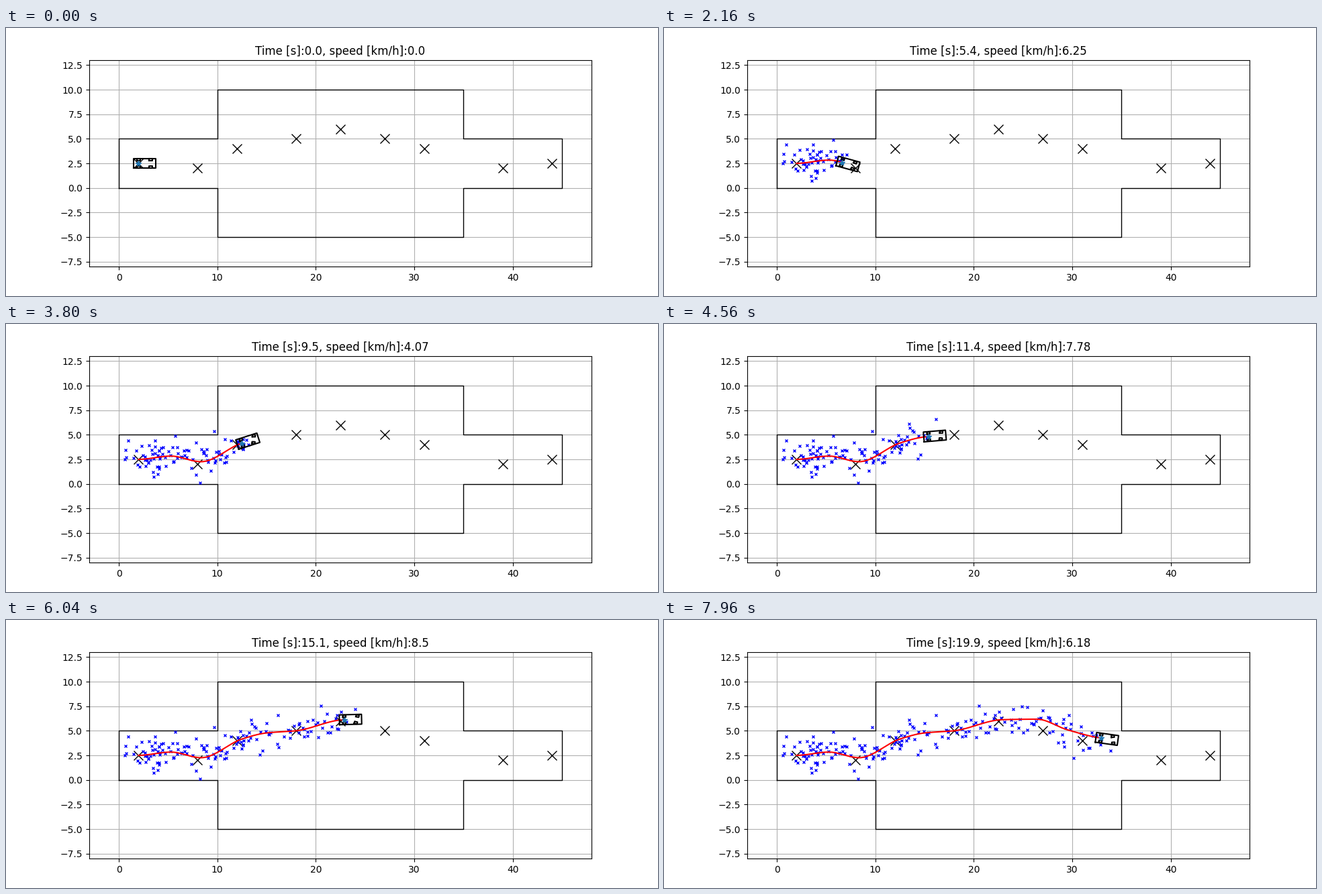
A matplotlib script that plays this animation: 971 px wide and 400 px high, repeating every 8 s.

```python
import numpy as np
import matplotlib.pyplot as plt
from matplotlib.animation import FuncAnimation

FRAMES, STEP_MS = 200, 40
WHEEL_BASE = 1.25

WALL = np.array([(0, 0), (10, 0), (10, -5), (35, -5), (35, 0), (45, 0), (45, 5),
                 (35, 5), (35, 10), (10, 10), (10, 5), (0, 5), (0, 0)])
GOALS = np.array([(2, 2.5), (8, 2), (12, 4), (18, 5), (22.5, 6), (27, 5),
                  (31, 4), (39, 2), (44, 2.5)])

# key points of the driven line: x, y
PATH = np.array([(2, 2.5), (5.3, 2.83), (8.35, 2.26), (12.5, 4.16), (15, 4.78), (18, 5),
                 (22.9, 6.13), (26.4, 6.18), (29.5, 5.1), (32.9, 4.26), (35, 4.05)])

# time [s], x [m], speed [km/h]
DRIVE = np.array([(0, 2, 0), (2.7, 4.1, 2.68), (5.4, 6.62, 6.25),
                  (9.5, 12.5, 4.07), (11.4, 15.42, 7.78), (15.1, 22.9, 8.5),
                  (19.9, 32.9, 6.18)])


def hermite(t, knots, vals, slopes):
    """Value and derivative of a cubic Hermite curve."""
    k = np.clip(np.searchsorted(knots, t, side="right") - 1, 0, len(knots) - 2)
    h = knots[k + 1] - knots[k]
    u = (t - knots[k]) / h
    p, q, a, b = vals[k], vals[k + 1], slopes[k] * h, slopes[k + 1] * h
    c2 = 3 * (q - p) - 2 * a - b
    c3 = 2 * (p - q) + a + b
    return p + u * (a + u * (c2 + u * c3)), (a + u * (2 * c2 + 3 * u * c3)) / h


def smooth_slopes(x, y):
    """Harmonic mean of neighbouring slopes, flat at every turning point."""
    d = np.diff(y) / np.diff(x)
    a, b = d[:-1], d[1:]
    inner = [2 * p * q / (p + q) if p * q > 0 else 0 for p, q in zip(a, b)]
    return np.array([0, *inner, d[-1]])


def rotate(pts, angle):
    c, s = np.cos(angle), np.sin(angle)
    return pts @ np.array([[c, s], [-s, c]])


def box(x0, x1, y0, y1):
    return np.array([(x0, y0), (x1, y0), (x1, y1), (x0, y1), (x0, y0)])


# road geometry on a dense grid
grid_x = np.arange(2, 35, 0.05)
grid_y, grid_slope = hermite(grid_x, *PATH.T, smooth_slopes(*PATH.T))
grid_yaw = np.arctan(grid_slope)
arc = np.r_[0, np.cumsum(np.hypot(np.diff(grid_x), np.diff(grid_y)))]
curve = np.convolve(np.gradient(grid_yaw, arc), np.ones(17) / 17, "same")

# pose for every step
times = np.arange(FRAMES) / 10
dist, speed = hermite(times, DRIVE[:, 0], np.interp(DRIVE[:, 1], grid_x, arc),
                      DRIVE[:, 2] / 3.6)
xs, ys, yaws, bend = (np.interp(dist, arc, g) for g in (grid_x, grid_y, grid_yaw, curve))
steers = np.clip(np.arctan(2.2 * WHEEL_BASE * bend), -0.38, 0.38)
steers *= np.minimum(times, 1)  # wheels start straight

# one noisy position fix per step
rng = np.random.default_rng(4)
fixes = np.c_[xs, ys] + rng.normal(0, 0.85, (FRAMES, 2))

BODY = box(-0.5, 1.75, -0.5, 0.5)
WHEELS = [box(-0.15, 0.15, side - 0.1, side + 0.1) for side in (-0.35, 0.35)]

fig, ax = plt.subplots(figsize=(9.71, 4), dpi=100)
fig.subplots_adjust(left=0.1254, right=0.9004)
ax.set_aspect("equal")
ax.set_xlim(-3, 48)
ax.set_ylim(-8, 13)
ax.set_xticks(range(0, 41, 10))
ax.set_yticks(np.arange(-7.5, 12.6, 2.5))
ax.grid(True)
ax.plot(*WALL.T, "-k", lw=1)
ax.plot(*GOALS.T, "xk", ms=10)
dots, = ax.plot([], [], "xb", ms=3)
trail, = ax.plot([], [], "-r")
car = [ax.plot([], [], "-k")[0] for _ in range(5)]
star, = ax.plot([], [], "*", color="C0")
title = ax.set_title("")


def update(i):
    pos = np.array([xs[i], ys[i]])
    dots.set_data(*fixes[1:i + 1].T)
    trail.set_data(xs[:i + 1], ys[:i + 1])
    front = [rotate(w, steers[i]) + (WHEEL_BASE, 0) for w in WHEELS]
    for line, shape in zip(car, [BODY, *front, *WHEELS]):
        line.set_data(*(rotate(shape, yaws[i]) + pos).T)
    star.set_data([xs[i]], [ys[i]])
    kmh = round(float(speed[i]) * 3.6, 2)
    title.set_text(f"Time [s]:{i / 10}, speed [km/h]:{kmh}")
    return [dots, trail, *car, star, title]


anim = FuncAnimation(fig, update, frames=FRAMES, interval=STEP_MS,
                     init_func=lambda: update(0), repeat=True, repeat_delay=0)
plt.show()
```
